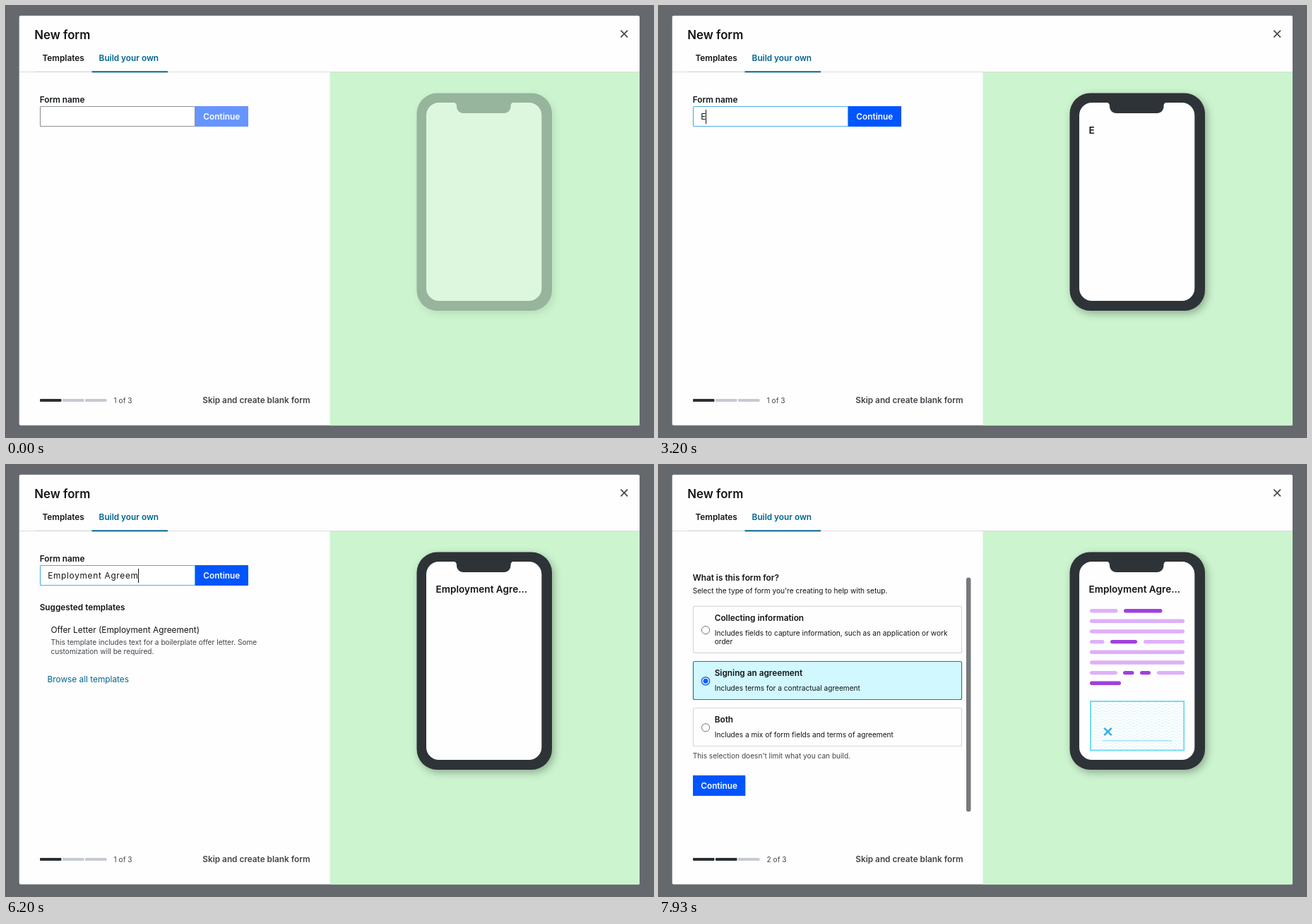
These frames come from a looping animation (916 by 611 pixels, 8000 ms). An HTML page with a canvas:

```html
<!DOCTYPE html>
<html lang="en">
<head>
<meta charset="utf-8">
<title>New form</title>
<style>
html, body { margin: 0; width: 100%; height: 100%; overflow: hidden; background: #65696d; }
canvas { display: block; width: 916px; height: 611px; }
</style>
</head>
<body>
<canvas id="stage" width="916" height="611"></canvas>
<script>
const LOOP = 8000, BLINK = 530;
const FOCUS = 1540, STEP2 = 7800;
const NAME = "Employment Agreement";
const KEYS = [2800, 3400, 3530, 3600, 3800, 3930, 4070, 4200, 4270, 4330,
  4400, 4530, 4600, 5330, 5400, 6000, 6130, 6400, 6600, 6800];
const INK = "#121417", SOFT = "#404449", BLUE = "#0055ff", LINK = "#006590";
const LILAC = "#dfb0f9", PURPLE = "#a23fdd", AQUA = "#76dcee";

const stage = document.getElementById("stage");
const main = stage.getContext("2d");
const layer = document.createElement("canvas");
layer.width = 916;
layer.height = 611;
const phoneCtx = layer.getContext("2d");
let c = main;

const clamp = v => Math.max(0, Math.min(1, v));
const span = (t, from, to) => clamp((t - from) / (to - from));
const smooth = p => p * p * (3 - 2 * p);
const mix = (a, b, p) => a + (b - a) * p;

function rect(x, y, x2, y2, color) {
  c.fillStyle = color;
  c.fillRect(x, y, x2 - x, y2 - y);
}

function round(x, y, x2, y2, r, fill, stroke, width = 1) {
  c.beginPath();
  c.roundRect(x, y, x2 - x, y2 - y, r);
  if (fill) { c.fillStyle = fill; c.fill(); }
  if (stroke) { c.strokeStyle = stroke; c.lineWidth = width; c.stroke(); }
}

function circle(x, y, r, fill, stroke, width = 1) {
  c.beginPath();
  c.arc(x, y, r, 0, 7);
  if (fill) { c.fillStyle = fill; c.fill(); }
  if (stroke) { c.strokeStyle = stroke; c.lineWidth = width; c.stroke(); }
}

function line(x, y, x2, y2, color, width) {
  c.beginPath();
  c.moveTo(x, y);
  c.lineTo(x2, y2);
  c.strokeStyle = color;
  c.lineWidth = width;
  c.stroke();
}

function cross(x, y, r, color, width) {
  line(x - r, y - r, x + r, y + r, color, width);
  line(x + r, y - r, x - r, y + r, color, width);
}

function text(str, x, y, size, weight, color, align = "left") {
  c.font = `${weight} ${size}px Inter, "Open Sans", sans-serif`;
  c.textAlign = align;
  c.fillStyle = color;
  c.fillText(str, x, y);
}

const bold = (str, x, y, color = INK) => text(str, x, y, 11.8, 600, color);
const plain = (str, x, y, color = INK) => text(str, x, y, 11.85, 400, color);
const small = (str, x, y, color = INK) => text(str, x, y, 10.13, 400, color);

function button(x, y, x2, color) {
  rect(x, y, x2, y + 29, color);
  text("Continue", (x + x2) / 2, y + 18.6, 11.8, 600, "#fff", "center");
}

function caretOn(t) {
  if (t < FOCUS) return false;
  if (t >= STEP2) return true;
  const last = KEYS.reduce((a, k) => (k <= t ? k : a), FOCUS);
  return Math.floor((t - last) / BLINK) % 2 === 0;
}

function input(y, typed, border, caret) {
  round(48.5, y + .5, 267.5, y + 28.5, 1, "#fff", border, 1.1);
  c.letterSpacing = "0.7px";
  plain(typed, 59.2, y + 18.8);
  const w = typed ? c.measureText(typed).width : .5;
  c.letterSpacing = "0px";
  if (caret) {
    const x = Math.round(58.6 + w);
    rect(x, y + 5, x + 1, y + 25, "#111");
  }
}

function frame() {
  rect(0, 0, 916, 611, "#65696d");
  round(18.7, 13.7, 897, 594.6, 2, "#fefefe");
  text("New form", 40.3, 47, 16.8, 600, INK);
  cross(875.2, 39.5, 4.8, "#4c5054", 1.9);
  rect(458.5, 94, 897, 594.5, "#ccf5cf");
  rect(19, 93, 897, 94, "#dadce0");
  rect(41, 92.7, 121.5, 93.7, "#d0d3d7");
  rect(121.5, 92.3, 229, 94.3, LINK);
  bold("Templates", 51.5, 78.3);
  bold("Build your own", 131.6, 78.3, LINK);
}

function footer(step) {
  for (let i = 0; i < 3; i++) {
    const x = 48 + i * 32;
    round(x, 557, x + 30.5, 561, 1, i < step ? "#2b2f33" : "#c5c9d1");
  }
  small(step + " of 3", 152.6, 562.8, SOFT);
  bold("Skip and create blank form", 278.3, 563, SOFT);
}

function stepOne(t, typed) {
  bold("Form name", 47.7, 136.6);
  const p = span(t, KEYS[0], KEYS[0] + 150);
  const active = `rgb(${mix(102, 0, p)},${mix(149, 85, p)},255)`;
  button(267.5, 142, 343, active);
  input(142, typed, t < FOCUS ? "#8d9196" : "#4aaee0", caretOn(t));
  if (t < KEYS[1]) return;
  bold("Suggested templates", 47.7, 206.4);
  plain("Offer Letter (Employment Agreement)", 63.4, 238.3);
  small("This template includes text for a boilerplate offer letter. Some", 63.5, 255, SOFT);
  small("customization will be required.", 63.5, 268, SOFT);
  plain("Browse all templates", 58.5, 308.3, LINK);
}

function card(y, h, dot, title, lines, selected) {
  round(48.5, y + .5, 428.5, y + h - .5, 2,
    selected ? "#d1f8fe" : "#fefefe", selected ? "#147d9c" : "#d4d7da", 1.2);
  circle(66, y + dot, 5.6, "#fff", selected ? "#0b62f5" : "#777", selected ? 1.4 : 1);
  if (selected) circle(66, y + dot, 3.5, "#0b62f5");
  bold(title, 78.7, y + 21.4);
  lines.forEach((s, i) => small(s, 78.7, y + 41.8 + i * 12.4));
}

function stepTwo(t) {
  const p = span(t, STEP2, 7930);
  c.save();
  c.beginPath();
  c.rect(19, 94.5, 439, 401);
  c.clip();
  c.save();
  c.translate(0, -Math.round(76 * p));
  bold("Form name", 47.7, 133.3);
  input(138.5, NAME, "#74b1d0", true);
  bold("What is this form for?", 47.7, 239.6);
  small("Select the type of form you're creating to help with setup.", 47.7, 258);
  card(275.8, 67, 34.3, "Collecting information", [
    "Includes fields to capture information, such as an application or work", "order"]);
  card(354, 55, 28.3, "Signing an agreement", ["Includes terms for a contractual agreement"], true);
  card(420, 55, 28.3, "Both", ["Includes a mix of form fields and terms of agreement"]);
  small("This selection doesn't limit what you can build.", 47.7, 491.8, SOFT);
  button(48, 516, 122.3, BLUE);
  c.restore();
  const y = 98.5 + 61 * p;
  round(435, y, 441.5, y + 332, 3.2, "#77797c");
  c.restore();
}

function bar(y, x, x2, color = LILAC) {
  round(x, y - 2.7, x2, y + 2.7, 2.7, color);
}

function agreement() {
  bar(206.7, 610, 649.5);
  bar(206.7, 658, 712.5, PURPLE);
  for (const y of [221.3, 236, 265.3, 280]) bar(y, 610, 744);
  bar(250.6, 610, 630.5);
  bar(250.6, 639, 677, PURPLE);
  bar(250.6, 686, 744);
  bar(294.6, 610, 649);
  bar(294.6, 657, 672.5, PURPLE);
  bar(294.6, 681, 696, PURPLE);
  bar(294.6, 705, 744);
  bar(309.2, 610, 654, PURPLE);

  c.save();
  c.beginPath();
  c.rect(610, 334, 134, 71.5);
  c.clip();
  c.strokeStyle = "#d6f4fa";
  c.lineWidth = .9;
  for (let y = 336; y < 408; y += 4.2) {
    c.beginPath();
    for (let x = 610; x <= 744; x++) c.lineTo(x, y + 1.2 * Math.sin(x * Math.PI / 5));
    c.stroke();
  }
  c.restore();
  c.strokeStyle = AQUA;
  c.lineWidth = 2;
  c.strokeRect(611, 335, 132.2, 69.5);
  cross(635.5, 378, 5.2, "#35aedb", 2.5);
  line(628, 391, 726, 391, AQUA, 1);
}

function notch() {
  c.beginPath();
  c.moveTo(633, 136.5);
  c.lineTo(719, 136.5);
  c.quadraticCurveTo(714.5, 137, 714.5, 142);
  c.arcTo(714.5, 152, 704, 152, 9);
  c.arcTo(638, 152, 638, 142, 9);
  c.lineTo(638, 142);
  c.quadraticCurveTo(638, 137, 633, 136.5);
  c.fillStyle = "#2e3337";
  c.fill();
}

function phone(t, typed) {
  c = phoneCtx;
  c.clearRect(0, 0, 916, 611);
  c.shadowColor = "rgba(0,0,0,.3)";
  c.shadowBlur = 12;
  c.shadowOffsetX = 3;
  c.shadowOffsetY = 4;
  round(581.5, 123.5, 773, 432, 29, "#2e3337");
  c.shadowColor = "transparent";
  round(595, 137, 758.3, 418, 18, "#fefefe");
  notch();
  const label = typed.length > 16 ? typed.slice(0, 15) + "..." : typed;
  text(label, 608.5, 180.8, 13.6, 600, INK);
  if (t >= STEP2) agreement();
  c = main;
  c.globalAlpha = mix(.33, 1, smooth(span(t, KEYS[0], KEYS[0] + 300)));
  c.drawImage(layer, 0, 0);
  c.globalAlpha = 1;
}

function pointer(t) {
  if (t < 1000 || t >= 2000) return;
  const p = smooth(span(t, 1000, 1500));
  c.save();
  c.globalAlpha = 1 - span(t, 1870, 2000);
  c.translate(mix(-12, 57, p), mix(230, 151, p));
  c.beginPath();
  for (const [x, y] of [[0, 0], [0, 12], [2.7, 9.5], [4.7, 14.3], [6.8, 13.4], [4.8, 8.8], [8.5, 8.6]]) c.lineTo(x, y);
  c.closePath();
  c.strokeStyle = "#fff";
  c.lineWidth = 1.6;
  c.stroke();
  c.fillStyle = "#000";
  c.fill();
  c.restore();
}

const start = performance.now();
function draw() {
  const t = (performance.now() - start) % LOOP;
  const typed = NAME.slice(0, KEYS.filter(k => k <= t).length);
  frame();
  if (t < STEP2) stepOne(t, typed);
  else stepTwo(t);
  footer(t < STEP2 ? 1 : 2);
  phone(t, typed);
  pointer(t);
  requestAnimationFrame(draw);
}
draw();
</script>
</body>
</html>
```
